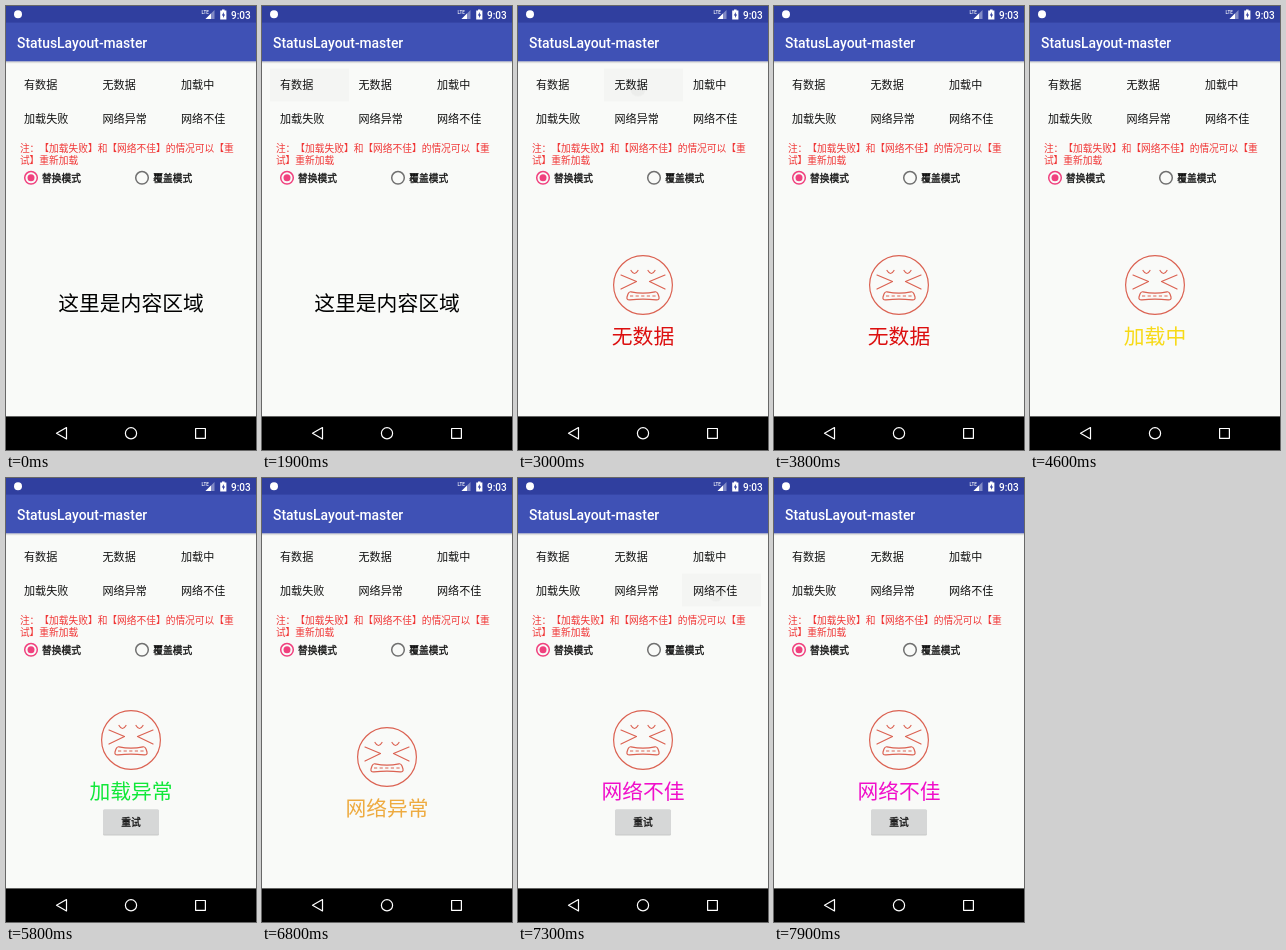
Animation, 250 px wide and 444 px high, one loop 8000 ms. Source, as an HTML page:

```html
<!DOCTYPE html>
<html lang="zh-CN">
<head>
<meta charset="utf-8">
<title>StatusLayout</title>
<style>
html, body { margin: 0; width: 100%; height: 100%; overflow: hidden; background: #f9faf8; }
svg { display: block; }
#stage { width: 100vw; height: 100vh; }
text {
  font-family: 'Noto Sans CJK SC', 'Noto Sans CJK', 'Noto Sans', sans-serif;
  text-spacing-trim: space-all; font-kerning: none;
}
.latin { font-family: Roboto, sans-serif; font-weight: 500; fill: #fff; font-kerning: auto; }
.labels { font-size: 11.1px; fill: #111; }
.hint { font-size: 9.72px; fill: #f03535; }
.modes, .retry { font-size: 9.72px; fill: #111; stroke: #111; stroke-width: .3; }
.retry { text-anchor: middle; }
.big { font-size: 20.8px; text-anchor: middle; }

/* Each status replaces the previous one with a hard cut. */
.scene { visibility: hidden; animation: 8s step-end infinite; }
.content { animation-name: content; }
.empty { animation-name: empty; }
.loading { animation-name: loading; }
.error { animation-name: error; }
.offline { animation-name: offline; }
.weak { animation-name: weak; }
@keyframes content { 0% { visibility: visible } 37.5%, 100% { visibility: hidden } }
@keyframes empty { 0% { visibility: hidden } 37.5% { visibility: visible } 51.25%, 100% { visibility: hidden } }
@keyframes loading { 0% { visibility: hidden } 51.25% { visibility: visible } 63.75%, 100% { visibility: hidden } }
@keyframes error { 0% { visibility: hidden } 63.75% { visibility: visible } 77.5%, 100% { visibility: hidden } }
@keyframes offline { 0% { visibility: hidden } 77.5% { visibility: visible } 91.25%, 100% { visibility: hidden } }
@keyframes weak { 0% { visibility: hidden } 91.25%, 100% { visibility: visible } }

/* Touch feedback, offset per button by --at. */
.press { opacity: 0; animation: press 8s step-end var(--at) infinite; }
.press rect { fill: #000; fill-opacity: .02; }
.press circle { fill: #000; fill-opacity: .035; animation: ripple 8s step-end var(--at) infinite; }
@keyframes press { 0% { opacity: 1 } 1.25% { opacity: .9 } 2.5% { opacity: .5 } 6.25%, 100% { opacity: 0 } }
@keyframes ripple { 0% { r: 8px } 1.25% { r: 22px } 2.5%, 100% { r: 44px } }
</style>
</head>
<body>
<svg id="stage" viewBox="0 0 250 444">
  <defs>
    <linearGradient id="shade" x2="0" y2="1">
      <stop stop-color="#000" stop-opacity=".2"/>
      <stop offset="1" stop-color="#000" stop-opacity="0"/>
    </linearGradient>
    <g id="face" fill="none" stroke="#db6252" stroke-width="1.2" stroke-linecap="round" stroke-linejoin="round">
      <circle r="29.4"/>
      <path d="M-12 -14.5q3.5 6 7 0M12 -14.5q-3.5 6 -7 0"/>
      <path d="M-22 -10L-6.5 -3.5L-22 4M22 -10L6.5 -3.5L22 4"/>
      <path d="M-12 6.8Q0 9.6 12 6.8Q14 6.4 15 9L16 12Q16.6 15.3 13 14.9Q0 13.2 -13 14.9Q-16.6 15.3 -16 12L-15 9Q-14 6.4 -12 6.8Z"/>
      <path d="M-13 11H13" stroke-dasharray="3.2 2.4" stroke-linecap="butt"/>
    </g>
    <g id="retry">
      <rect x="97" y="332.3" width="56" height="25.2" rx="1.5" fill="#000" opacity=".2"/>
      <rect x="97" y="331.2" width="56" height="25.2" rx="1.5" fill="#d6d7d7"/>
      <text class="retry" x="125" y="347.6">重试</text>
    </g>
  </defs>

  <rect width="250" height="444" fill="#f9faf8"/>
  <rect y="55.3" width="250" height="2.5" fill="url(#shade)"/>
  <rect width="250" height="55.3" fill="#3f51b5"/>
  <rect width="250" height="16.6" fill="#303f9f"/>
  <circle cx="12" cy="8.3" r="4" fill="#fff"/>
  <text class="latin" x="195.5" y="7.8" font-size="4.6">LTE</text>
  <path d="M208.5 4V13H199.5Z" fill="#fff" opacity=".4"/>
  <path d="M205 7.5V13H199.5Z" fill="#fff"/>
  <path d="M216 3.4h2.6v1.2h1.8v8.8h-6.2V4.6H216Z" fill="#fff"/>
  <path d="M217.8 6l-2 3.5h1.3v2.6l2-3.6h-1.3Z" fill="#303f9f"/>
  <text class="latin" x="225" y="12.5" font-size="10">9:03</text>
  <text class="latin" x="11" y="41.8" font-size="13.9">StatusLayout-master</text>

  <svg class="press" style="--at:1.9s" x="8" y="62.5" width="79" height="33"><rect width="79" height="33"/></svg>
  <svg class="press" style="--at:3s" x="86" y="62.5" width="79" height="33"><rect width="79" height="33"/><circle cx="34" cy="20" r="8"/></svg>
  <svg class="press" style="--at:4.1s" x="164" y="62.5" width="79" height="33"><rect width="79" height="33"/><circle cx="34" cy="20" r="8"/></svg>
  <svg class="press" style="--at:5.1s" x="8" y="95.5" width="79" height="33"><rect width="79" height="33"/><circle cx="34" cy="20" r="8"/></svg>
  <svg class="press" style="--at:6.2s" x="86" y="95.5" width="79" height="33"><rect width="79" height="33"/><circle cx="34" cy="20" r="8"/></svg>
  <svg class="press" style="--at:7.3s" x="164" y="95.5" width="79" height="33"><rect width="79" height="33"/><circle cx="34" cy="20" r="8"/></svg>

  <g class="labels">
    <text x="18" y="83.4">有数据</text><text x="96.5" y="83.4">无数据</text><text x="175" y="83.4">加载中</text>
    <text x="18" y="116.6">加载失败</text><text x="96.5" y="116.6">网络异常</text><text x="175" y="116.6">网络不佳</text>
  </g>
  <g class="hint">
    <text x="13.9" y="146.2">注：【加载失败】和【网络不佳】的情况可以【重</text>
    <text x="13.9" y="158">试】重新加载</text>
  </g>
  <g fill="none" stroke-width="1.5">
    <circle cx="25" cy="171.8" r="6.3" stroke="#f0407e"/>
    <circle cx="25" cy="171.8" r="3.5" fill="#f0407e"/>
    <circle cx="136" cy="171.8" r="6.3" stroke="#707070"/>
  </g>
  <g class="modes"><text x="36" y="175.5">替换模式</text><text x="147.3" y="175.5">覆盖模式</text></g>

  <g class="scene content"><text class="big" x="125" y="304.8" fill="#000">这里是内容区域</text></g>
  <g class="scene empty"><use href="#face" x="125" y="279"/><text class="big" x="125" y="337.8" fill="#dc0f0f">无数据</text></g>
  <g class="scene loading"><use href="#face" x="125" y="279"/><text class="big" x="125" y="337.8" fill="#f7da18">加载中</text></g>
  <g class="scene error"><use href="#face" x="125" y="262"/><text class="big" x="125" y="321" fill="#12e83a">加载异常</text><use href="#retry"/></g>
  <g class="scene offline"><use href="#face" x="125" y="279"/><text class="big" x="125" y="337.8" fill="#eeab40">网络异常</text></g>
  <g class="scene weak"><use href="#face" x="125" y="262"/><text class="big" x="125" y="321" fill="#f00fca">网络不佳</text><use href="#retry"/></g>

  <rect y="410.4" width="250" height="34" fill="#000"/>
  <g fill="none" stroke="#fff" stroke-width="1.2" stroke-linejoin="round">
    <path d="M50.5 427.3L60.5 421.6V433Z"/>
    <circle cx="125" cy="427.3" r="5.6"/>
    <rect x="189.6" y="422.5" width="9.8" height="9.8"/>
  </g>
</svg>
</body>
</html>
```
